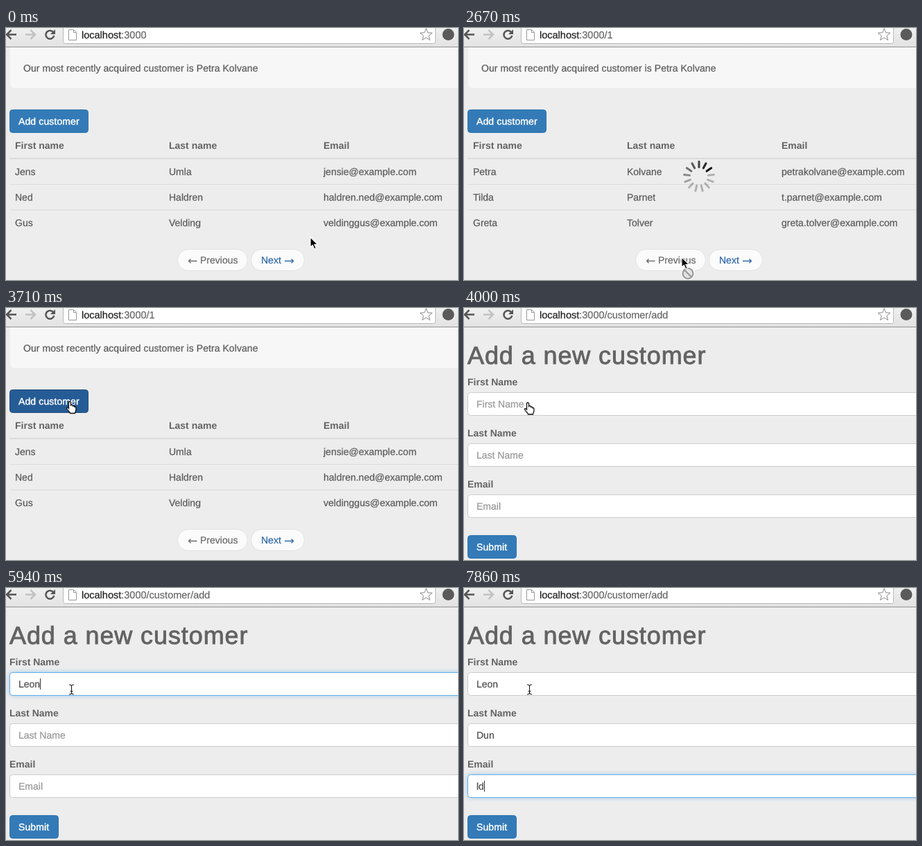
An HTML page for the animation above (8 s loop, 652 by 365 pixels).

```html
<!DOCTYPE html>
<html lang="en">
<head>
<meta charset="utf-8">
<title>Customer list</title>
<style>
html, body { margin: 0; width: 100%; height: 100%; overflow: hidden; background: #ededed; }
svg { display: block; }
text { font: 14px "Liberation Sans", Arial, sans-serif; fill: #5c5c5c; stroke: #5c5c5c; stroke-width: .25; text-rendering: geometricPrecision; white-space: pre; }
.message { letter-spacing: .06px; }
.bold { font-weight: bold; fill: #636363; stroke: none; }
.title { font-size: 36px; letter-spacing: .9px; fill: #636363; stroke: #636363; stroke-width: .9; }
.url { font-size: 14.5px; fill: #6a6a6a; stroke: #6a6a6a; }
.url .host { fill: #222; stroke: #222; }
.button { fill: #337ab7; stroke: #2f75b3; }
.button.hover { fill: #265c95; stroke: #204d7c; }
.caption { fill: #fff; stroke: #fff; stroke-width: .45; letter-spacing: .12px; }
.pill { color: #6c6c6c; }
.pill.link { color: #2f68ae; }
.pill.hover { color: #23527c; }
.pill rect { fill: #fbfbfb; stroke: #e2e2e2; }
.pill.hover rect { fill: #eee; }
.pill text { fill: currentColor; stroke: currentColor; }
.pill path { fill: none; stroke: currentColor; stroke-width: 1.3; }
.rule { stroke: #dbdbdb; }
.field { fill: #fff; stroke: #ccc; }
.glow { fill: #fff; stroke: #66afe9; filter: drop-shadow(0 0 3px rgba(102, 175, 233, .6)); }
.value { fill: #505050; stroke: #505050; }
.value.empty { fill: #999; stroke: #999; }
.icon { fill: none; stroke: #555; stroke-width: 2.5; }
</style>
</head>
<body>
<svg width="652" height="365" viewBox="0 0 652 365">
  <defs>
    <linearGradient id="bar" x2="0" y2="1">
      <stop stop-color="#efefef"/><stop offset="1" stop-color="#e3e3e3"/>
    </linearGradient>
  </defs>
  <rect width="652" height="365" fill="#ededed"/>

  <g id="list">
    <rect x="6" y="22" width="660" height="65" rx="6" fill="#f7f7f7"/>
    <text class="message" x="25" y="63">Our most recently acquired customer is Petra Kolvane</text>
    <rect id="add" class="button" x="5.5" y="118.5" width="113" height="33" rx="4"/>
    <text class="caption" x="18" y="140">Add customer</text>
    <text class="bold" x="13" y="175">First name</text>
    <text class="bold" x="235" y="175">Last name</text>
    <text class="bold" x="458" y="175">Email</text>
    <path class="rule" stroke-width="2" d="M5 189H652"/>
    <path class="rule" d="M5 226.5H652M5 263.5H652"/>
    <g id="rows"></g>
    <g id="prev">
      <rect x="247.5" y="320.5" width="101" height="31" rx="15.5"/>
      <path d="M275.5 337.5H263.5M266.5 334.5L263.5 337.5L266.5 340.5"/>
      <text x="280" y="341">Previous</text>
    </g>
    <g id="next">
      <rect x="353.5" y="320.5" width="77" height="31" rx="15.5"/>
      <text x="368" y="341">Next</text>
      <path d="M402 337.5H414.5M411.5 334.5L414.5 337.5L411.5 340.5"/>
    </g>
    <g id="spinner" transform="translate(339 215)" stroke="#111" stroke-width="3" stroke-linecap="round"></g>
  </g>

  <g id="form">
    <text class="title" x="5" y="81">Add a new customer</text>
    <g id="fields"></g>
    <rect class="button" x="5.5" y="329.5" width="70" height="33" rx="4"/>
    <text class="caption" x="18" y="351">Submit</text>
    <path id="caret" stroke="#333" d="M0 -13V3"/>
  </g>

  <g id="toolbar">
    <rect width="652" height="27" fill="url(#bar)"/>
    <path stroke="#929292" d="M0 27.5H652"/>
    <rect x="82.5" y="-6.5" width="537" height="29" rx="3" fill="#fff" stroke="#b8b8b8"/>
    <path class="icon" d="M15 9.5H1.5M7.5 3L1 9.5L7.5 16"/>
    <path class="icon" style="stroke:#c2c2c2" d="M28 9.5H41.5M35.5 3L42 9.5L35.5 16"/>
    <path class="icon" d="M68.2 6A6 6 0 1 0 69.3 11"/>
    <path fill="#555" d="M71 2V9H64Z"/>
    <path fill="#fff" stroke="#999" d="M90.5 2.5H97.5L101.5 6.5V17.5H90.5ZM97.5 2.5V6.5H101.5"/>
    <path id="star" fill="#fff" stroke="#888"/>
    <circle cx="638" cy="9.5" r="8.5" fill="#5a5a5a"/>
    <text class="url" x="109" y="15"><tspan class="host">localhost</tspan><tspan id="path"></tspan></text>
  </g>

  <g id="cursor">
    <g id="banned">
      <circle cx="9" cy="23.5" r="7.5" fill="#ededed" stroke="#fff" stroke-width="4.5"/>
      <circle cx="9" cy="23.5" r="7.5" fill="#e4e4e4" stroke="#999" stroke-width="2.2"/>
      <path stroke="#999" stroke-width="2.2" d="M4 18.5L14 28.5"/>
    </g>
    <path id="arrow" stroke="#fff" stroke-width="1.2" d="M0 0V14.5L3.3 11.5L5.8 17L8.3 16L5.9 10.5H10.5Z"/>
    <path id="hand" fill="#fff" stroke="#111" stroke-width="1.3" d="M3.5 10V2a1.5 1.5 0 0 1 3 0V7V6a1.4 1.4 0 0 1 2.7 0V7.5a1.3 1.3 0 0 1 2.5 0V9a1.1 1.1 0 0 1 2.2 .3V12.5c0 2-1.4 3-1.4 5H5.5c0-2-3-3.5-4.7-6.5c-1-2 1-2.5 2.7-.5z"/>
    <g id="beam" fill="none">
      <path stroke="#fff" stroke-width="3" d="M0 -5V5" opacity=".7"/>
      <path stroke="#222" stroke-width="1.2" d="M-3.5 -7Q0 -7 0 -4.5Q0 -7 3.5 -7M0 -5V5M-3.5 7Q0 7 0 4.5Q0 7 3.5 7M-2 2.5H2"/>
    </g>
  </g>
</svg>
<script>
const LOOP = 8000;
const $ = id => document.getElementById(id);
const show = (id, on) => { $(id).style.display = on ? "" : "none"; };

const pages = [
  [["Jens", "Umla", "jensie@example.com"],
   ["Ned", "Haldren", "haldren.ned@example.com"],
   ["Gus", "Velding", "veldinggus@example.com"]],
  [["Petra", "Kolvane", "petrakolvane@example.com"],
   ["Tilda", "Parnet", "t.parnet@example.com"],
   ["Greta", "Tolver", "greta.tolver@example.com"]],
];
const columns = [13, 235, 458];
const labels = ["First Name", "Last Name", "Email"];

// Each step overrides part of the state from its time on.
const steps = [
  [0, { view: "list", path: ":3000", rows: 0, pager: 0, spinner: false, hover: "",
        cursor: ["arrow", 439, 303], banned: false, glow: [0, 0, 0], active: -1, values: ["", "", ""] }],
  [290, { cursor: ["hand", 399, 326], hover: "next" }],
  [440, { cursor: ["hand", 378, 335] }],
  [1190, { path: ":3000/2", rows: 1, pager: 1, hover: "", cursor: ["arrow", 382, 334], banned: true }],
  [1930, { cursor: ["arrow", 350, 335], banned: false }],
  [2080, { cursor: ["hand", 322, 334], hover: "prev" }],
  [2230, { cursor: ["hand", 310, 333] }],
  [2670, { path: ":3000/1", pager: 0, spinner: true, hover: "", cursor: ["arrow", 314, 332], banned: true }],
  [2820, { rows: 0, spinner: false }],
  [3120, { cursor: ["arrow", 288, 306], banned: false }],
  [3270, { cursor: ["arrow", 212, 234] }],
  [3420, { cursor: ["arrow", 138, 172] }],
  [3570, { cursor: ["hand", 96, 140], hover: "add" }],
  [3710, { cursor: ["hand", 87, 135] }],
  [4000, { view: "form", path: ":3000/customer/add", hover: "", cursor: ["hand", 87, 136.5] }],
  [4300, { cursor: ["beam", 94.5, 147] }],
  [4590, { glow: [1, 0, 0], active: 0 }],
  [5190, { values: ["L", "", ""] }],
  [5340, { values: ["Le", "", ""] }],
  [5640, { values: ["Leo", "", ""] }],
  [5790, { values: ["Leon", "", ""] }],
  [6090, { glow: [.5, .5, 0], active: 1 }],
  [6230, { glow: [0, 1, 0] }],
  [6530, { values: ["Leon", "D", ""] }],
  [6680, { values: ["Leon", "Du", ""] }],
  [6830, { values: ["Leon", "Dun", ""] }],
  [7120, { glow: [0, 0, 1], active: 2 }],
  [7420, { values: ["Leon", "Dun", "l"] }],
  [7860, { values: ["Leon", "Dun", "ld"] }],
];

function build() {
  $("rows").innerHTML = pages.map(page => "<g>" + page.map((row, r) =>
    row.map((cell, c) => `<text x="${columns[c]}" y="${213 + 37 * r}">${cell}</text>`).join("")
  ).join("") + "</g>").join("");

  $("fields").innerHTML = labels.map((label, i) => {
    const y = 74 * i;
    const box = `x="5.5" y="${122.5 + y}" width="680" height="33" rx="4"`;
    return `<text class="bold" x="5" y="${112 + y}">${label}</text>
      <rect class="field" ${box}/><rect class="glow" ${box}/>
      <text class="value" x="18" y="${144 + y}"></text>`;
  }).join("");

  // Bars fade counterclockwise from the third one.
  const bars = 13;
  $("spinner").innerHTML = Array.from({ length: bars }, (_, k) =>
    `<path d="M0 -13.5V-21.5" transform="rotate(${(2 - k) * 360 / bars})" opacity="${Math.max(.28, 1 - k * .11)}"/>`
  ).join("");

  const points = Array.from({ length: 10 }, (_, k) => {
    const radius = k % 2 ? 4 : 9.3, angle = Math.PI * (k / 5 - .5);
    return `${606 + radius * Math.cos(angle)} ${10 + radius * Math.sin(angle)}`;
  });
  $("star").setAttribute("d", "M" + points.join("L") + "Z");
}

function render(s) {
  show("list", s.view === "list");
  show("form", s.view === "form");
  $("path").textContent = s.path;
  [...$("rows").children].forEach((g, i) => { g.style.display = i === s.rows ? "" : "none"; });
  ["next", "prev"].forEach((id, page) => {
    $(id).setAttribute("class", "pill" + (s.pager === page ? " link" : "") + (s.hover === id ? " hover" : ""));
  });
  $("add").classList.toggle("hover", s.hover === "add");
  show("spinner", s.spinner);

  const glows = document.querySelectorAll(".glow");
  document.querySelectorAll(".value").forEach((text, i) => {
    text.textContent = s.values[i] || labels[i];
    text.classList.toggle("empty", !s.values[i]);
    glows[i].style.opacity = s.glow[i];
    if (i === s.active) {
      const width = s.values[i] ? text.getComputedTextLength() : 0;
      $("caret").setAttribute("transform", `translate(${Math.round(18 + width) + .5} ${144 + 74 * i})`);
    }
  });
  show("caret", s.active >= 0);

  const [shape, x, y] = s.cursor;
  ["arrow", "hand", "beam"].forEach(id => show(id, id === shape));
  show("banned", s.banned);
  $("cursor").setAttribute("transform", `translate(${x} ${y})`);
}

let current = -1;
function frame() {
  const time = performance.now() % LOOP;
  const count = steps.filter(([start]) => start <= time).length;
  if (count !== current) {
    current = count;
    render(Object.assign({}, ...steps.slice(0, count).map(step => step[1])));
  }
  requestAnimationFrame(frame);
}

build();
frame();
</script>
</body>
</html>
```
